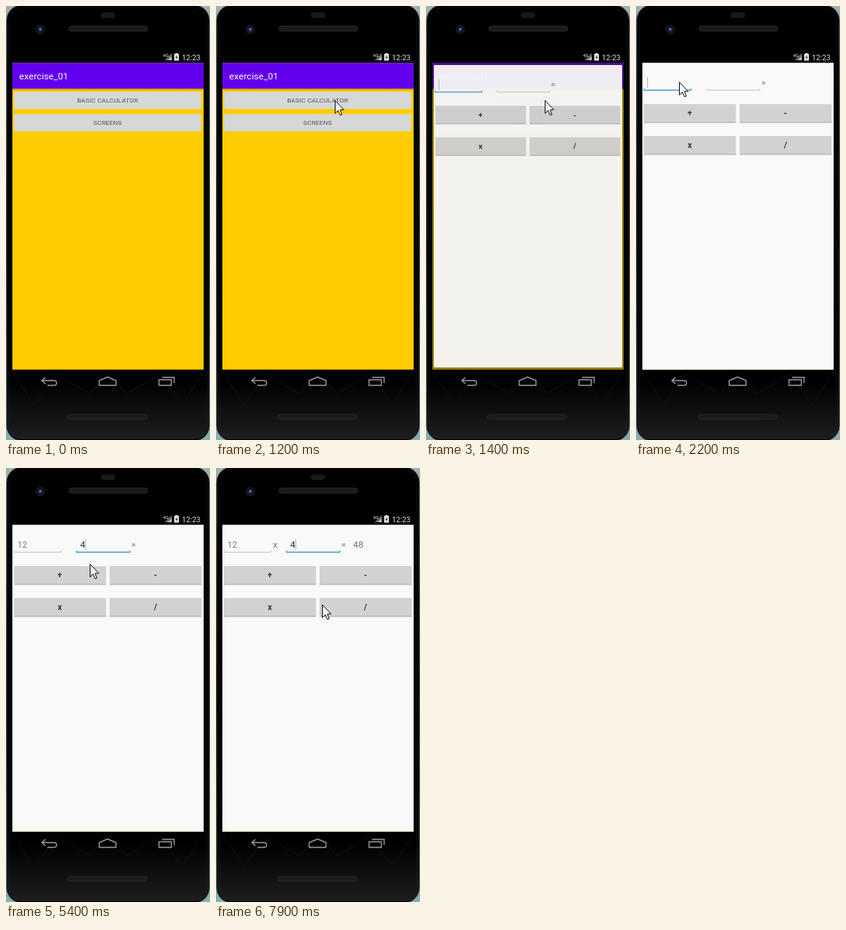
Recreate the animation shown at these times as an HTML page. Size 256 px wide and 544 px high, loop 8000 ms.

```html
<!DOCTYPE html>
<html lang="en">
<head>
<meta charset="utf-8">
<title>exercise_01</title>
<style>
  html, body { margin: 0; width: 100%; height: 100%; overflow: hidden; background: #000; }
  svg { display: block; width: 256px; height: 544px; font-family: Roboto, sans-serif; }
  .mid { text-anchor: middle; }
  .label { font-size: 8.1px; letter-spacing: .15px; fill: #555; }
  .key { font-size: 10px; font-weight: 700; fill: #333; }
  .value { font-size: 11.7px; fill: #757575; }
  .nav { fill: none; stroke: #969696; stroke-width: 1.4; }
  .slot { fill: #1b1b1b; stroke: #2b2b2b; stroke-width: .7; }
  .wide { fill: #d6d7d7; stroke: #e6d581; stroke-width: .7; }
</style>
</head>
<body>
<svg viewBox="0 0 256 544">
  <defs>
    <linearGradient id="desk" x2="0" y2="1">
      <stop offset="0" stop-color="#a3b0b2"/>
      <stop offset=".5" stop-color="#4a5255"/>
      <stop offset="1" stop-color="#86b0ac"/>
    </linearGradient>
    <linearGradient id="glow" x2="0" y2="1">
      <stop offset="0" stop-color="#1e1e1e" stop-opacity="0"/>
      <stop offset="1" stop-color="#1e1e1e"/>
    </linearGradient>
    <linearGradient id="shade" x2="0" y2="1">
      <stop offset="0" stop-opacity=".25"/>
      <stop offset="1" stop-opacity="0"/>
    </linearGradient>
    <clipPath id="screen"><rect x="8" y="71.3" width="240" height="384.4"/></clipPath>
  </defs>

  <!-- phone -->
  <rect width="256" height="544" fill="url(#desk)"/>
  <rect x="1" y="-1" width="254" height="546" rx="19" fill="#020202" stroke="#222628"/>
  <rect x="4" y="2" width="248" height="540" rx="16" fill="#000" stroke="#0e0f10"/>
  <path d="M2 470H254V526Q254 543 237 543H19Q2 543 2 526Z" fill="url(#glow)"/>
  <rect x="119" y="8" width="18" height="7" rx="3.5" fill="#181818"/>
  <rect class="slot" x="79" y="25" width="99" height="6.5" rx="3"/>
  <rect class="slot" x="77" y="512" width="100" height="6" rx="3"/>
  <circle cx="43" cy="29.5" r="5.3" fill="#0f121a" stroke="#22252c" stroke-width=".8"/>
  <circle cx="43" cy="29.5" r="2.5" fill="#23376f"/>
  <circle cx="43" cy="29" r="1" fill="#8299c4"/>
  <path d="M8 458L35 500L62 462L105 486L128 460L151 486L194 462L221 500L248 458" fill="none" stroke="#131313" stroke-width=".8"/>

  <!-- status bar -->
  <path d="M208 59V68H199Z" fill="#666"/>
  <path d="M208 63V68H203Z" fill="#bbb"/>
  <text x="197" y="64" font-size="5.5" font-weight="700" fill="#aaa">4G</text>
  <path d="M211 60H212.5V59H215.5V60H217V68.5H211Z" fill="#ddd"/>
  <path d="M214.7 61.5L212.6 65H214L213.4 67.3L215.6 63.7H214.2Z" fill="#222"/>
  <text x="220.7" y="67.5" font-size="9.4" fill="#e0e0e0">12:23</text>

  <!-- navigation bar -->
  <path class="nav" d="M49.5 465.5L45 469.5L49.5 473.5M45 469.5H60Q63.5 469.5 63.5 472.5T60 475.5H52"/>
  <path class="nav" d="M117 475.5V469.5L127.5 465L138 469.5V475.5Z"/>
  <path class="nav" d="M192 468.5H207.5V475.5H192ZM196 465.5H211V472.5"/>

  <g clip-path="url(#screen)">
    <g id="menu">
      <rect x="8" y="71" width="240" height="385" fill="#fc0"/>
      <rect x="8" y="71" width="240" height="32.6" fill="#6200ee"/>
      <rect x="8" y="103.6" width="240" height="3" fill="url(#shade)"/>
      <text x="16.6" y="92" font-size="11.7" fill="#fff">exercise_01</text>
      <rect class="wide" x="10" y="107.6" width="235" height="21.4" rx="1"/>
      <rect class="wide" x="10" y="135.6" width="235" height="21.4" rx="1"/>
      <text class="mid label" x="127.5" y="121">BASIC CALCULATOR</text>
      <text class="mid label" x="127.5" y="149">SCREENS</text>
    </g>
    <rect id="scrim" x="8" y="71" width="240" height="385"/>
    <g id="calc">
      <rect x="8" y="71" width="240" height="385" fill="#f9f9f9"/>
      <path id="lineA" d="M10 103.5V105.5H69V103.5" fill="none"/>
      <path id="lineB" d="M88.5 103.5V105.5H155.5V103.5" fill="none"/>
      <text id="textA" class="value" x="14.6" y="100.3" style="font-size:10.5px"></text>
      <text id="textB" class="value" x="93" y="100.3" style="fill:#333"></text>
      <rect id="caret" y="89" width="1" height="14" fill="#b4b4b4"/>
      <text id="op" class="value mid" x="74.3" y="100.3"></text>
      <text class="value" x="157.3" y="99.8" style="font-size:10.5px">=</text>
      <text id="result" class="value" x="172" y="100.3"></text>
      <g id="keys"></g>
    </g>
  </g>

  <path id="cursor" d="M.5 .5V16.5L4.2 13L6.8 18.8L9 18L6.7 12H11.4Z" fill="#fff" stroke="#111" stroke-linejoin="round"/>
</svg>
<script>
const $ = id => document.getElementById(id);
const LOOP = 8000, STEP = 100;

// [time, x, y] of the pointer tip
const path = [
  [100, 244, 57], [200, 206, 84], [300, 165, 114], [400, 149, 125],
  [500, 149, 125], [800, 149, 118], [1600, 149, 118], [2100, 54, 95],
  [3700, 54, 95], [4000, 96, 97], [4100, 105, 97], [5200, 105, 97],
  [5500, 105, 132], [6300, 105, 132], [6400, 130, 133], [6500, 147, 132],
  [7200, 147, 132], [7500, 91, 170], [7800, 91, 170], [7900, 133, 171]
];
// [start, value] tables
const typedA = [[0, ''], [3500, '1'], [3700, '12']];
const typedB = [[0, ''], [5100, '4']];
const ops = [[0, ''], [6000, '+'], [7200, '-'], [7700, 'x']];
const results = [[0, ''], [6000, '16'], [7200, '8'], [7700, '48']];
const caretOn = [[0, 1], [1800, 0], [2200, 1], [2600, 0], [3100, 1], [4700, 0],
  [5100, 1], [5600, 0], [6000, 1], [6500, 0], [6900, 1], [7400, 0], [7900, 1]];
const pressed = [[0, ''], [5900, '+'], [6000, ''], [7100, '-'], [7200, '']];
// [start, scale, opacity, scrim]
const opening = [[0, 1, 0, 0], [1300, .94, .72, .27], [1400, .985, .95, .4], [1500, 1, 1, 0]];

const row = (table, t) => table.filter(r => r[0] <= t).pop();
const at = (table, t) => row(table, t)[1];

const keys = {};
for (const [name, x, y] of [['+', 10, 123], ['-', 130, 123], ['x', 10, 163], ['/', 130, 163]]) {
  const g = document.createElementNS('http://www.w3.org/2000/svg', 'g');
  g.innerHTML = `<rect x="${x}" y="${y}" width="115.5" height="23"/>
    <rect x="${x}" y="${y + 22.5}" width="115.5" height="1" fill="#aaa"/>
    <text class="mid key" x="${x + 57.5}" y="${y + 15.2}">${name}</text>`;
  $('keys').append(g);
  keys[name] = g.firstChild;
}

function pointer(t) {
  const i = path.findIndex(p => p[0] > t);
  if (i < 0) return path[path.length - 1].slice(1);
  const [t0, x0, y0] = path[i - 1], [t1, x1, y1] = path[i];
  const k = (t - t0) / (t1 - t0);
  return [Math.round(x0 + (x1 - x0) * k), Math.round(y0 + (y1 - y0) * k)];
}

function underline(el, focused) {
  el.setAttribute('stroke', focused ? '#4f9ddb' : '#c6c6c6');
  el.setAttribute('stroke-width', focused ? 1.4 : 1);
}

function draw(t) {
  $('cursor').style.display = t < 100 ? 'none' : '';
  if (t >= 100) $('cursor').setAttribute('transform', `translate(${pointer(t)})`);

  const [, scale, alpha, dark] = row(opening, t);
  $('calc').setAttribute('transform', `translate(128 263.2) scale(${scale}) translate(-128 -263.2)`);
  $('calc').setAttribute('opacity', alpha);
  $('scrim').setAttribute('opacity', dark);

  const a = at(typedA, t), b = at(typedB, t), second = t >= 4200;
  $('textA').textContent = a;
  $('textB').textContent = b;
  $('op').textContent = at(ops, t);
  $('result').textContent = at(results, t);
  underline($('lineA'), !second);
  underline($('lineB'), second);
  $('caret').setAttribute('x', second ? 92.5 + b.length * 7 : 14 + a.length * 6);
  $('caret').setAttribute('opacity', at(caretOn, t));

  const down = at(pressed, t);
  for (const name in keys) keys[name].setAttribute('fill', name === down ? '#bdbdbd' : '#d2d2d2');
}

const start = performance.now();
function tick() {
  const t = (performance.now() - start) % LOOP;
  draw(Math.floor(t / STEP) * STEP);
  requestAnimationFrame(tick);
}
tick();
</script>
</body>
</html>
```
